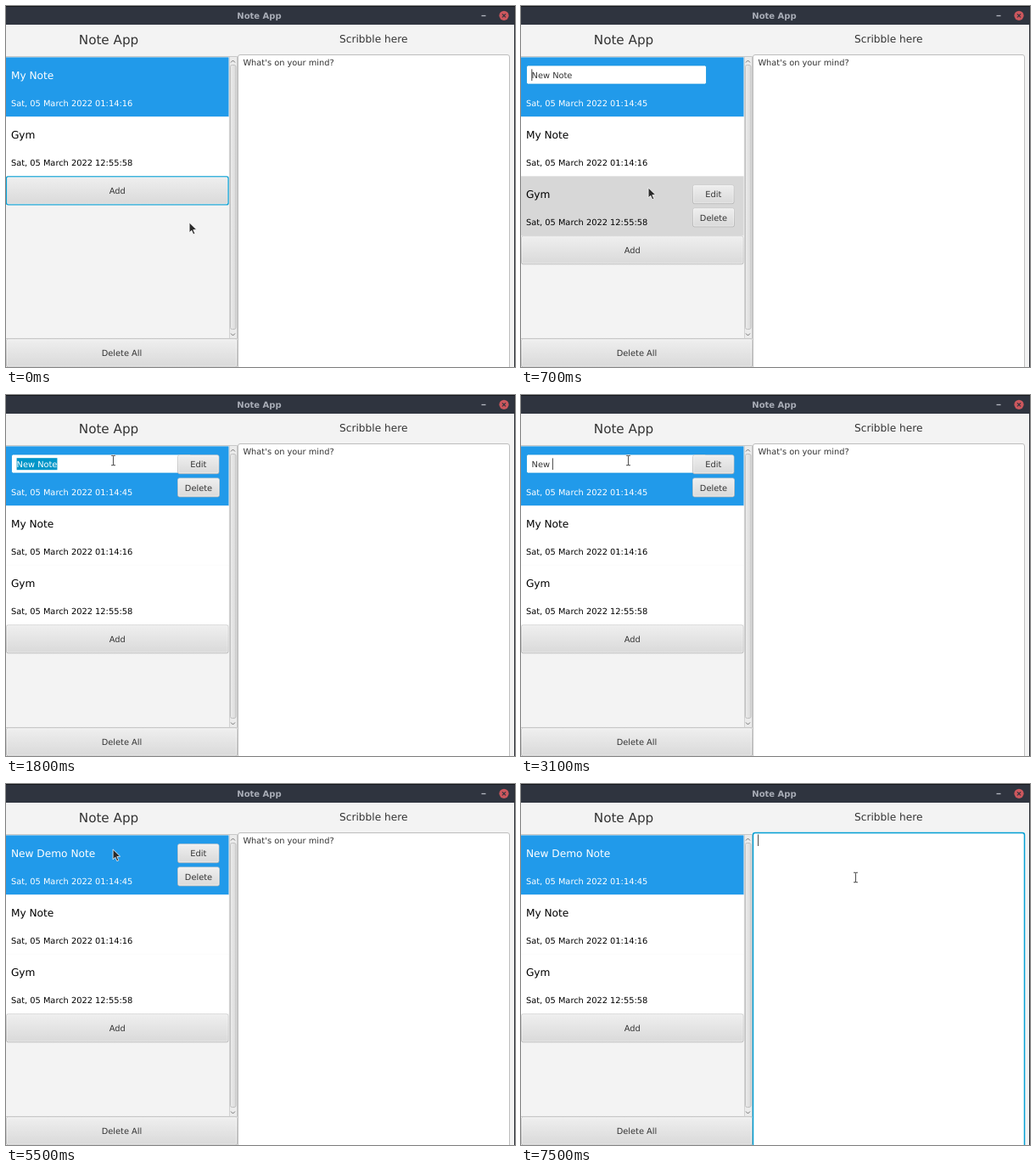
An HTML page for the animation above (8000 ms loop, 600 by 425 pixels).

```html
<!DOCTYPE html>
<html lang="en">
<head>
<meta charset="utf-8">
<title>Note App</title>
<style>
  html, body { margin: 0; width: 100%; height: 100%; overflow: hidden; background: #f3f3f3; }
  svg { display: block; width: 100%; height: 100%; font-family: "DejaVu Sans", sans-serif; text-rendering: geometricPrecision; }
  text { white-space: pre; }
</style>
</head>
<body>
<svg id="stage" viewBox="0 0 600 425">
  <defs>
    <linearGradient id="face" x2="0" y2="1"><stop stop-color="#efefef"/><stop offset="1" stop-color="#d9d9d9"/></linearGradient>
    <linearGradient id="lit" x2="0" y2="1"><stop stop-color="#f8f8f8"/><stop offset="1" stop-color="#e3e3e3"/></linearGradient>
    <linearGradient id="edge" x2="0" y2="1"><stop stop-color="#c9c9c9"/><stop offset="1" stop-color="#b0b0b0"/></linearGradient>
    <linearGradient id="thumb"><stop stop-color="#ececec"/><stop offset="1" stop-color="#dadada"/></linearGradient>
  </defs>
  <rect width="600" height="425" fill="#f3f3f3"/>
  <rect width="600" height="22" fill="#2f343f"/>
  <rect width="600" height="1" fill="#16181c"/>
  <text x="298.5" y="15.2" font-size="10" font-weight="bold" fill="#a9adb7" text-anchor="middle">Note App</text>
  <path d="M560.5 11.5h5" stroke="#b4b8c1" stroke-width="1.3"/>
  <circle cx="587" cy="11.3" r="5.6" fill="#cc575d"/>
  <path d="M585 9.3l4 4m0-4l-4 4" stroke="#2f343f" stroke-width="1.2"/>
  <text x="121" y="44.8" font-size="15.2" fill="#333" text-anchor="middle">Note App</text>
  <text x="433.3" y="43" font-size="12.2" fill="#333" text-anchor="middle">Scribble here</text>
  <path d="M0 59.5H272.5V391.5H0" fill="none" stroke="#c8c8c8"/>
  <rect x="263" y="60" width="9" height="331" fill="#ebebeb"/>
  <path d="M263.5 60V391" stroke="#d2d2d2"/>
  <rect x="264.5" y="69.5" width="6.5" height="311" rx="2" fill="url(#thumb)" stroke="#bdbdbd" stroke-width=".9"/>
  <path d="M265 66.5l2.5-2.5 2.5 2.5M265 385.5l2.5 2.5 2.5-2.5" fill="none" stroke="#777"/>
  <g id="scene"></g>
  <rect x="599" y="1" width="1" height="424" fill="#2b2e35"/>
</svg>
<script>
const LOOP = 8000, SMALL = 9.84, BLUE = '#039ed3', ROW = 70, TOP = 60.4;
const PROMPT = "What's on your mind?", TITLE = 'New Demo Note', DAY = 'Sat, 05 March 2022 ';
const scene = document.getElementById('scene');
const pen = document.createElement('canvas').getContext('2d');

// Pointer: time, x, y
const POINTER = [
  [0, 216, 255], [100, 210, 246], [200, 196, 230], [300, 184, 222], [400, 176, 219],
  [600, 168, 218], [700, 150, 214], [800, 134, 158], [900, 126, 104], [1000, 126, 97],
  [1100, 126, 88], [1200, 126, 82], [1300, 126, 78], [1400, 126, 77], [5600, 126, 83],
  [6200, 129, 85], [6300, 135, 86], [6500, 165, 87], [6600, 225, 90], [6700, 290, 88],
  [6800, 339, 85], [6900, 372, 99], [7100, 389, 108], [7200, 394, 110]
];
// Typing: time, letters present
const TYPED = [
  [2500, 1], [2700, 2], [2900, 3], [3100, 4], [3500, 5], [3700, 6],
  [3800, 8], [3900, 9], [4300, 10], [4400, 11], [4700, 13]
];

const latest = (keys, t) => keys.filter(k => k[0] <= t).pop();
const within = (t, a, b) => t >= a && t < b;

function widthOf(s) {
  pen.font = `${SMALL}px "DejaVu Sans", sans-serif`;
  return pen.measureText(s).width;
}

const label = (s, x, y, size, fill, anchor = 'start') =>
  `<text x="${x}" y="${y}" font-size="${size}" fill="${fill}" text-anchor="${anchor}">${s}</text>`;

const box = (x, y, w, h, fill, more = '') =>
  `<rect x="${x}" y="${y}" width="${w}" height="${h}" fill="${fill}" ${more}/>`;

function button(s, x, y, w, h, focused, hover) {
  const edge = focused ? `stroke="${BLUE}" stroke-width="1.4"` : 'stroke="url(#edge)" stroke-width=".8"';
  return box(x + .5, y + .5, w - 1, h - 1, `url(#${hover ? 'lit' : 'face'})`, `rx="2" ${edge}`) +
    box(x + 1.4, y + 1.4, w - 2.8, h - 2.8, 'none', 'rx="1.5" stroke="#fff" stroke-opacity=".5" stroke-width=".8"') +
    label(s, x + w / 2, y + h / 2 + 3.6, SMALL, '#333', 'middle');
}

// Text line with optional selection and caret (caret < 0 hides it)
function editable(s, x, y, selected, caret) {
  let out = '';
  if (selected) out += box(x, y - 11, widthOf(s), 14, '#0096c9');
  out += label(s, x, y, SMALL, selected ? '#fff' : '#333');
  if (caret >= 0) out += box(x + widthOf(s.slice(0, caret)) - .3, y - 10.8, 1, 13.6, '#444');
  return out;
}

function titleField(t) {
  const typed = latest(TYPED, t);
  const s = typed ? TITLE.slice(0, typed[1]) : 'New Note';
  let caret = -1;
  if (t < 1000) caret = 0;
  else if (within(t, 1400, 1800) || within(t, 2500, 5200)) caret = s.length;
  return box(6.5, 70, 212, 22, '#fff', 'rx="2" stroke="#1593dc" stroke-width=".8"') +
    editable(s, 12.6, 85.2, within(t, 1800, 2500), caret);
}

function row(note, y, selected, hover, t) {
  const ink = selected ? '#fff' : '#000';
  const fill = selected ? '#219aea' : hover ? '#d7d7d7' : '#fff';
  return box(0, y, 262.5, ROW, fill) +
    (note.editing ? titleField(t) : label(note.title, 5.9, y + 25.6, 12.2, ink)) +
    label(DAY + note.time, 5.9, y + 57.2, SMALL, ink) +
    (hover ? button('Edit', 202, y + 9.8, 49.5, 23) + button('Delete', 202, y + 37, 50, 23) : '');
}

function pointer(x, y, beam) {
  if (!beam) return `<path transform="translate(${x - .2} ${y - .4})" d="M.3 .3V12.2L3 9.7 5 14.2 7 13.3 5 9 8.8 8.6Z"
    fill="#2b2b2b" stroke="#fff" stroke-opacity=".85" stroke-width=".9"/>`;
  const d = 'M-2.5 -5.7H-.8L0 -5 .8 -5.7H2.5M0 -5V5M-2.5 5.7H-.8L0 5 .8 5.7H2.5';
  return `<g transform="translate(${x + .5} ${y})" fill="none">
    <path d="${d}" stroke="#fff" stroke-width="2.2"/><path d="${d}" stroke="#555" stroke-width="1.1"/></g>`;
}

function textArea(t) {
  const focused = t >= 6900, cleared = t >= 7500;
  const s = cleared ? '' : PROMPT;
  const caret = within(t, 6900, 7200) || cleared ? s.length : -1;
  const edge = focused ? `stroke="${BLUE}" stroke-width="1.5"` : 'stroke="#bdbdbd"';
  return box(273.5, 57.5, 320, 380, '#fff', `rx="2.5" ${edge}`) +
    editable(s, 279.4, 70.2, within(t, 7200, 7500), caret);
}

function draw(t) {
  const [, x, y] = latest(POINTER, t);
  const added = t >= 500, editing = within(t, 500, 5500);
  const notes = [{ title: 'My Note', time: '01:14:16' }, { title: 'Gym', time: '12:55:58' }];
  if (added) notes.unshift({ title: TITLE, time: '01:14:45', editing });

  const overRow = x < 263 ? Math.floor((y - TOP) / ROW) : -1;
  const addTop = TOP + notes.length * ROW;
  const overAdd = x < 263 && within(y, addTop, addTop + 34);
  const overField = editing && within(x, 6, 202) && within(y, 70, 92);

  return notes.map((n, i) => row(n, TOP + i * ROW, i === 0, i === overRow, t)).join('') +
    button('Add', 0, addTop, 262.5, 34, !added, overAdd) +
    button('Delete All', 0, 391.5, 273, 34) +
    (within(t, 6100, 6900) ? box(0, 58.8, 273, 1.5, BLUE) : '') +
    textArea(t) +
    pointer(x, y, overField || x > 273);
}

let shown = '';
function tick() {
  const next = draw(performance.now() % LOOP);
  if (next !== shown) scene.innerHTML = shown = next;
  requestAnimationFrame(tick);
}
tick();
</script>
</body>
</html>
```
